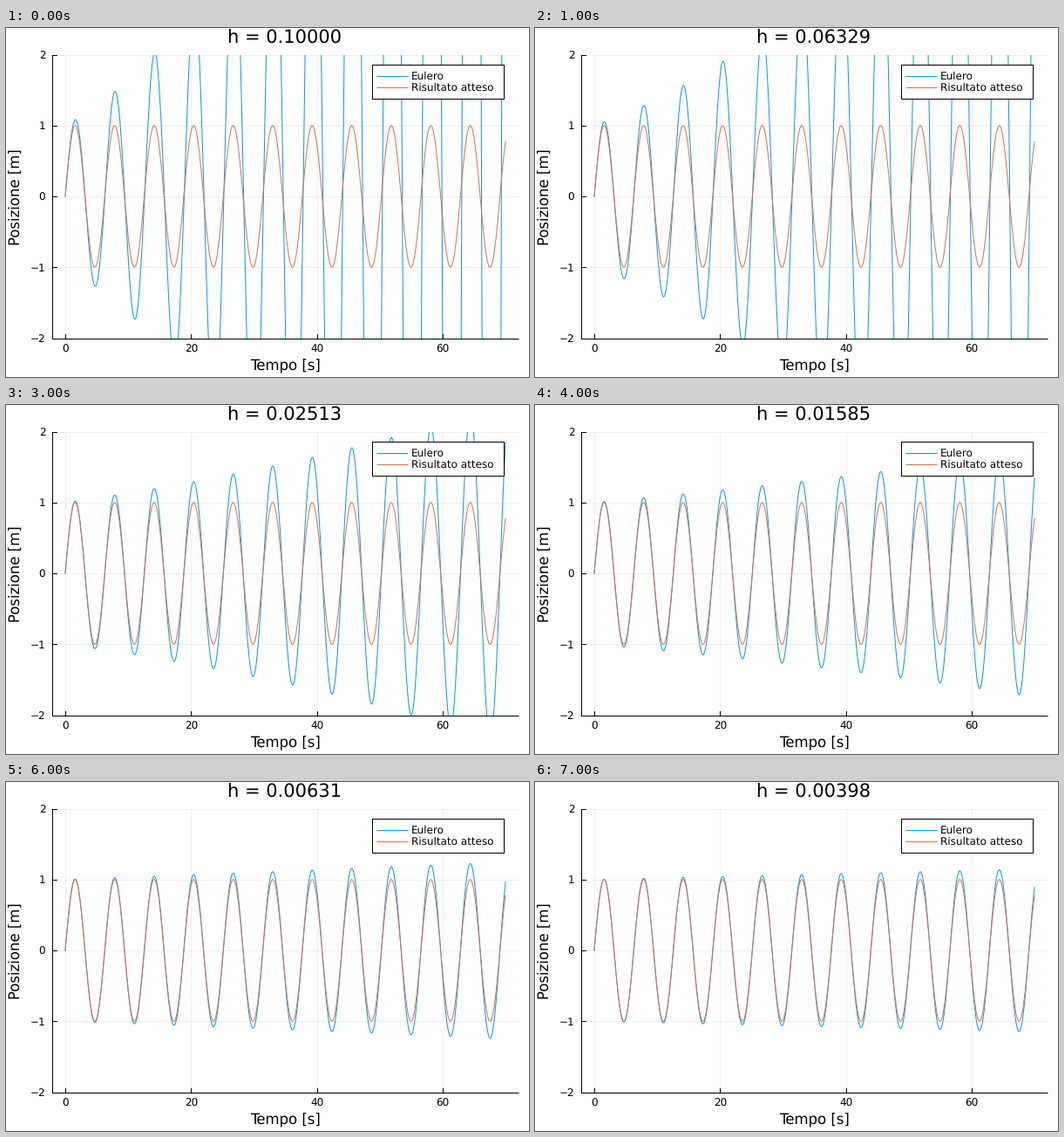
These frames come from a looping animation (600 by 400 pixels, 8000 ms). A matplotlib script:

```python
import numpy as np
import matplotlib.pyplot as plt
from matplotlib.animation import FuncAnimation
from matplotlib.patches import Rectangle

plt.rcParams.update({
    "font.family": "DejaVu Sans",
    "text.hinting": "none",
    "path.simplify": False,
})

W, H, DPI = 600, 400, 100
PT = 72 / DPI  # points per pixel
LEFT, RIGHT, TOP, BOTTOM = 52.8, 588.2, 30.5, 355.5
T_MIN, T_MAX, T_END = -2.1, 72.1, 70
BLUE, ORANGE = "#009AFA", "#E36F47"
SMALL, MEDIUM, LARGE = 12, 16.5, 21
DIGIT, MINUS = 0.636 * SMALL, 0.838 * SMALL
FRAMES = 8

fig = plt.figure(figsize=(W / DPI, H / DPI), dpi=DPI, facecolor="white")
page = fig.add_axes([0, 0, 1, 1])
page.set_xlim(0, W)
page.set_ylim(H, 0)
page.axis("off")


def px(t):
    return LEFT + (t - T_MIN) * (RIGHT - LEFT) / (T_MAX - T_MIN)


def py(x):
    return (TOP + BOTTOM) / 2 - x * (BOTTOM - TOP) / 4


def line(xs, ys, color="black", width=1.0, **kw):
    return page.plot(xs, ys, color=color, lw=width * PT, **kw)[0]


def label(x, y, text, size, **kw):
    return page.text(x, y, text, fontsize=size * PT, ha="left",
                     va="baseline", **kw)


def draw_axes():
    for t in (0, 20, 40, 60):
        x = px(t)
        line([x, x], [TOP, BOTTOM], alpha=0.06, zorder=1)
        line([x, x], [BOTTOM, BOTTOM - 5], zorder=2)
        text = str(t)
        label(x - len(text) * DIGIT / 2, 372, text, SMALL)
    for v in range(-2, 3):
        y = py(v)
        line([LEFT, RIGHT], [y, y], alpha=0.06, zorder=1)
        line([LEFT, LEFT + 5], [y, y], zorder=2)
        text = str(v).replace("-", "\u2212")
        label(45.3 - DIGIT - (MINUS if v < 0 else 0), y + 4.4, text, SMALL)
    line([LEFT, LEFT], [TOP, BOTTOM], zorder=2, solid_capstyle="butt")
    line([LEFT, RIGHT], [BOTTOM, BOTTOM], zorder=2, solid_capstyle="butt")
    label(280, 392, "Tempo [s]", MEDIUM)
    label(17, 249, "Posizione [m]", MEDIUM, rotation=90,
          rotation_mode="anchor")


def draw_legend():
    page.add_patch(Rectangle((419.5, 41.5), 151, 39, facecolor="white",
                             edgecolor="black", lw=PT, zorder=5))
    rows = ((54.5, BLUE, "Eulero"), (67.5, ORANGE, "Risultato atteso"))
    for y, color, text in rows:
        line([425, 461], [y, y], color, zorder=6, solid_capstyle="butt")
        label(465, y + 4.5, text, SMALL, zorder=6)


draw_axes()
draw_legend()
title = label(253.6, 18, "", LARGE)
euler = line([], [], BLUE, zorder=3)
exact = line([], [], ORANGE, zorder=4)
for curve in (euler, exact):
    curve.set_clip_path(Rectangle((LEFT, TOP), RIGHT - LEFT, BOTTOM - TOP,
                                  transform=page.transData))


def update(k):
    steps = 7 * round(10 ** (2 + 0.2 * k))
    h = T_END / steps
    n = np.arange(steps + 1)
    t = n * h
    # closed form of the explicit Euler steps: Im (1 + ih)^n
    x = (1 + h * h) ** (n / 2) * np.sin(n * np.arctan(h))
    euler.set_data(px(t), py(x))
    exact.set_data(px(t), py(np.sin(t)))
    title.set_text(f"h = {h:.5f}")
    return euler, exact, title


anim = FuncAnimation(fig, update, frames=FRAMES, init_func=lambda: update(0),
                     interval=1000, repeat=True, repeat_delay=0, blit=False)
plt.show()
```
